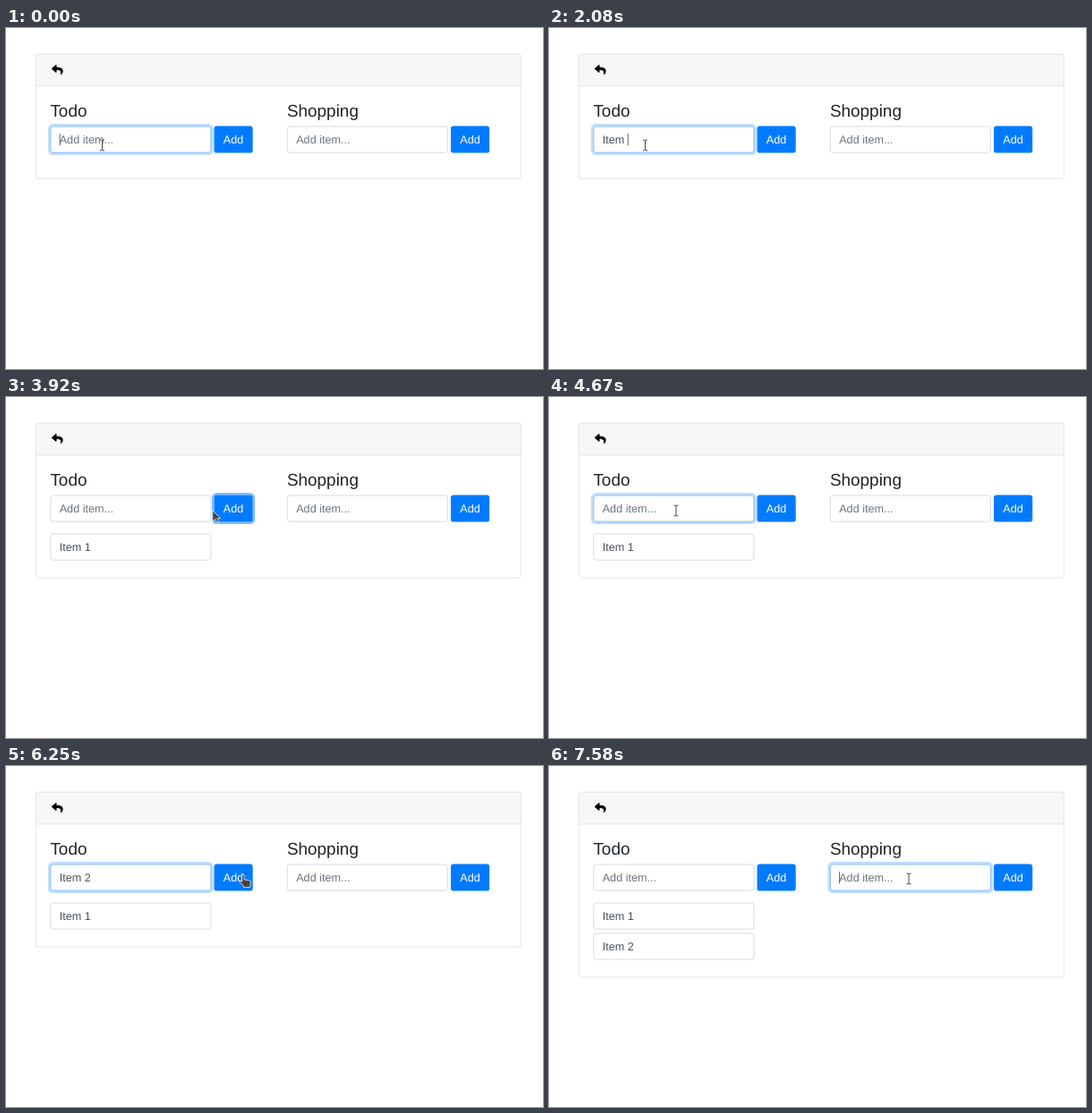
These frames come from a looping animation (600x381 px, 8000 ms). An HTML page:

```html
<!DOCTYPE html>
<html lang="en">
<head>
<meta charset="utf-8">
<title>Todo lists</title>
<style>
  html, body { margin: 0; height: 100%; overflow: hidden; background: #fff; }
  svg { display: block; width: 100%; height: 100%; }
  text {
    font: 12.64px "Liberation Sans", Arial, sans-serif;
    white-space: pre;
    text-rendering: geometricPrecision;
    fill: #495057;
  }
  .title { font-size: 18.96px; fill: #212529; }
  .label { fill: #fff; text-anchor: middle; }
  .hint { fill: #6c757d; }
  .box { fill: #fff; stroke: #ced4da; stroke-width: .8; }
  .ring { fill: none; stroke: #007bff; stroke-width: 2.5; }
  .edge { fill: none; stroke: #80bdff; stroke-width: .8; }
  #cursor path { stroke-linejoin: round; }
  .solid { fill: #444; stroke: #fff; stroke-width: .7; }
</style>
</head>
<body>
<svg id="stage" viewBox="0 0 600 381"></svg>
<script>
const TICK = 1000 / 12, LOOP = 8000;

const rect = (cls, x, y, w, h, r = 2.8, more = '') =>
  `<rect class="${cls}" x="${x}" y="${y}" width="${w}" height="${h}" rx="${r}" ${more}/>`;
const field = y => rect('box', 49.8, y + .4, 179.1, 29.2);

const column = (title, i) => `
  <g transform="translate(${i * 264.5})">
    <text class="title" x="49.4" y="98.7">${title}</text>
    ${field(109.6)}
    <g id="focus${i}">
      ${rect('ring', 48.15, 108.35, 182.4, 32.5, 4.4, 'stroke-opacity=".25"')}
      ${rect('edge', 49.8, 110, 179.1, 29.2)}
    </g>
    <text id="value${i}" class="hint" x="59.7" y="128.9">Add item...</text>
    ${rect('', 232.5, 109.6, 43.2, 30, 3.2, `id="button${i}" fill="#007bff"`)}
    <text class="label" x="254.1" y="128.9">Add</text>
  </g>`;

const item = i => `
  <g id="item${i}" transform="translate(0 ${34 * i})">
    ${field(152.6)}
    <text x="59.7" y="171.9">Item ${i + 1}</text>
  </g>`;

document.getElementById('stage').innerHTML = `
  ${rect('', 33.2, 29.1, 542.2, 36, 2.8, 'fill="#f7f7f7"')}
  <path d="M33.2 64.9H575.4" stroke="#dfdfdf" stroke-width=".8"/>
  <rect id="card" x="33.2" y="29.1" width="542.2" rx="2.8" fill="none" stroke="#dfdfdf" stroke-width=".8"/>
  <path transform="translate(51 40.3) scale(.0247)" d="M8 190L184 38C200 25 224 35 224 56v80c161 2 288 34 288 186 0 62-40 123-83 154-14 10-33-2-28-18 45-145-22-184-177-186V360c0 21-24 31-40 18L8 226c-11-9-11-27 0-36z"/>
  ${column('Todo', 0)}${column('Shopping', 1)}
  ${item(0)}${item(1)}
  ${rect('ring', 231.25, 108.35, 45.7, 32.5, 4.4, 'id="focus2" stroke-opacity=".5"')}
  <rect id="caret" y="118" width=".9" height="13.4" fill="#495057"/>
  <g id="cursor">
    <path id="beam" fill="none" stroke="#444" d="M-2.5-6Q0-6 0-5V5Q0 6-2.5 6M2.5-6Q0-6 0-5M0 5Q0 6 2.5 6"/>
    <path id="hand" class="solid" d="M-1.3.8Q0-.6 1.2.8V6L6.5 6.8Q8.6 7.2 8.5 9L7.6 12V14.5H.6V13L-3.6 9Q-4 7.4-2.6 7.4L-1.3 8.4Z"/>
    <path id="arrow" class="solid" d="M0 0V12L3 9.5 5 14 7 13 5 8.7H9Z"/>
  </g>`;

const $ = id => document.getElementById(id);
const show = (id, on) => $(id).setAttribute('opacity', +on);
const within = (n, a, b) => n >= a && n < b;

// Pointer stops: tick, x, y
const stops = [
  [0, 107.5, 131], [36, 107.5, 131], [41, 253, 121], [44, 255, 122], [46, 262, 127],
  [49, 142, 127], [69, 142, 127], [75, 265, 121], [81, 275, 128], [84, 180, 124],
  [89, 402, 108], [90, 402, 106], [91, 402, 126], [96, 402, 126]
];
const typing = [
  { text: 'Item 1', keys: [10, 16, 17, 22, 25, 32], sent: 45 },
  { text: 'Item 2', keys: [57, 59, 60, 61, 63, 66], sent: 78 }
];

function pointer(n) {
  const i = stops.findIndex(s => s[0] > n);
  const [a, ax, ay] = stops[i - 1], [b, bx, by] = stops[i];
  const p = (n - a) / (b - a), e = p * p * (3 - 2 * p);
  return [ax + (bx - ax) * e, ay + (by - ay) * e];
}

function shape(x, y) {
  if (y < 109 || y > 140) return 'arrow';
  const local = x > 313 ? x - 264.5 : x;
  if (within(local, 49, 230)) return 'beam';
  return within(local, 232, 276) ? 'hand' : 'arrow';
}

// 0 todo field, 1 shopping field, 2 todo button
const focused = n => n >= 90 ? 1 : within(n, 44, 50) || n >= 77 ? 2 : 0;

const caretOn = n => n < 3 || within(n, 10, 38) || within(n, 50, 56) ||
  within(n, 57, 72) || n >= 90;

function draw(n) {
  const entry = typing.find(e => n < e.sent);
  const typed = entry ? entry.text.slice(0, entry.keys.filter(k => k <= n).length) : '';
  const value = $('value0');
  value.textContent = typed || 'Add item...';
  value.setAttribute('class', typed ? '' : 'hint');

  for (let i = 0; i < 3; i++)
    show('focus' + i, ((focused(n) === i) + (focused(n - 1) === i)) / 2);
  const hover = within(n, 42, 47) || within(n, 76, 83);
  $('button0').setAttribute('fill', hover ? '#0069d9' : '#007bff');

  const start = n >= 90 ? 324.2 : 59.7;
  $('caret').setAttribute('x', start + (typed ? value.getComputedTextLength() : 0));
  show('caret', caretOn(n));

  const count = typing.filter(e => n >= e.sent).length;
  show('item0', count > 0);
  show('item1', count > 1);
  $('card').setAttribute('height', [139.2, 172.9, 206.9][count]);

  const [x, y] = pointer(n), kind = shape(x, y);
  $('cursor').setAttribute('transform', `translate(${x} ${y})`);
  for (const id of ['beam', 'hand', 'arrow']) show(id, id === kind);
}

let begin;
function frame(now) {
  begin ??= now;
  draw(Math.min(95, Math.floor(((now - begin) % LOOP + 4) / TICK)));
  requestAnimationFrame(frame);
}
draw(0);
requestAnimationFrame(frame);
</script>
</body>
</html>
```
